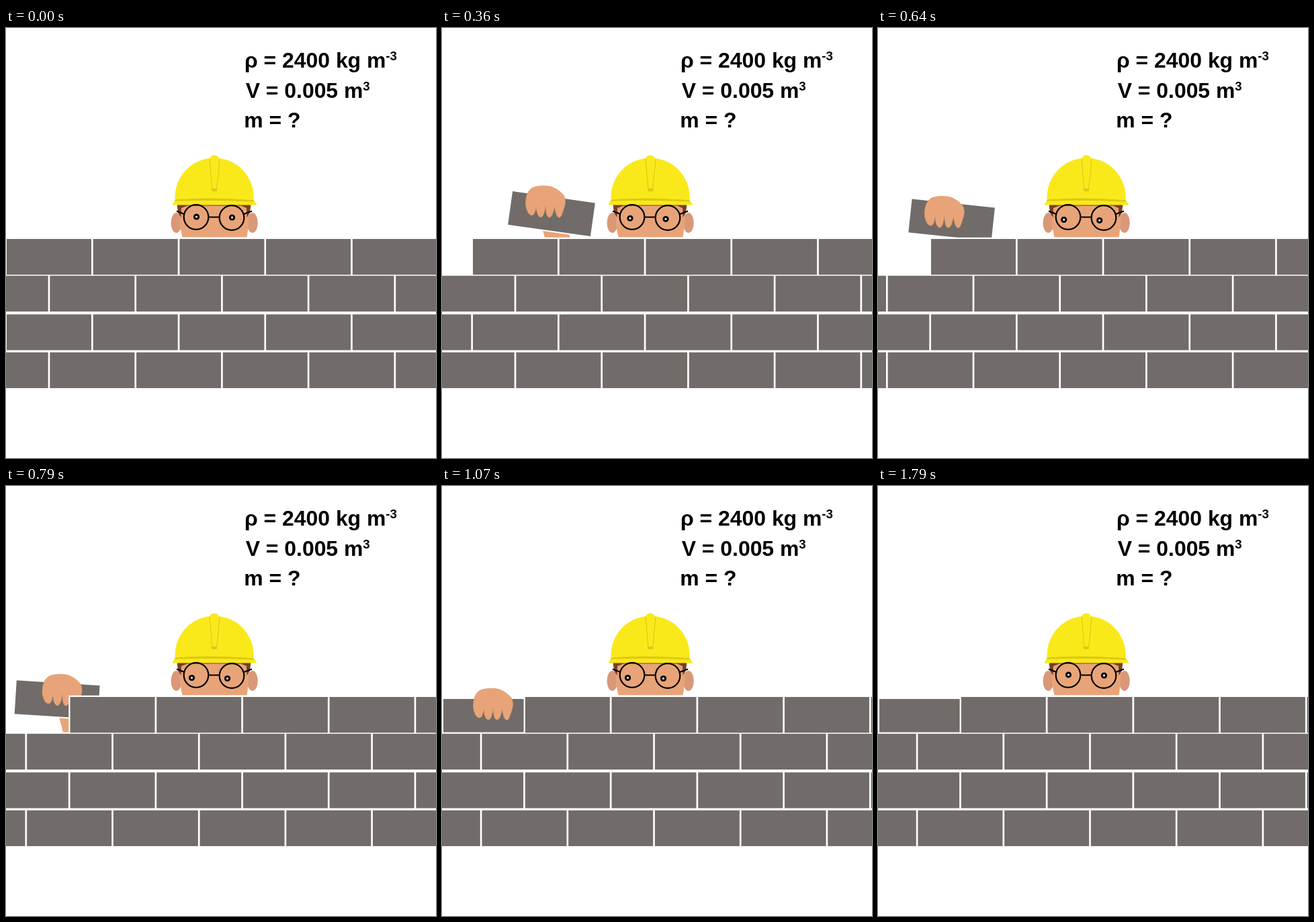
Animation, 640 px wide and 640 px high, one loop 1930 ms. Source, as an HTML page:

```html
<!DOCTYPE html>
<html lang="en">
<head>
<meta charset="utf-8">
<title>Bricklayer</title>
<style>
  html, body { margin: 0; width: 100%; height: 100%; overflow: hidden; background: #fff; }
  svg { display: block; width: 100%; height: 100%; }
  text { font: bold 31.9px "Liberation Sans", Arial, sans-serif; }
  .sup { font-size: 18.6px; }
  .brick { fill: #716c69; stroke: #fff; paint-order: stroke; }
  .skin { fill: #e8a478; }
  .ear { fill: #d99878; }
  .hair { fill: #7a3f20; }
  .hat { fill: #f9e91a; }
  .shade { fill: #dcc714; }
  .line { fill: none; stroke: #000; stroke-width: 2.2; }
</style>
</head>
<body>
<svg viewBox="0 0 640 640">
  <g>
    <text x="355" y="59.4">ρ = 2400 kg m<tspan class="sup" dy="-11.5">-3</tspan></text>
    <text x="356.7" y="104.4">V = 0.005 m<tspan class="sup" dy="-11.5">3</tspan></text>
    <text x="354.3" y="148">m = ?</text>
  </g>

  <path id="arm" class="skin" d="M17 25H52L63 62 75 112H38L25 62Z"/>
  <rect id="held" class="brick" x="-62" y="-25" width="124" height="50" stroke-width="4"/>
  <path id="hand" class="skin" stroke="#d9966d" stroke-width=".8" d="M1 20C2 14 4 7 11 3
    C19 0 29 -.5 38 1.5C46 4 53 9 57.5 15C60 20 60 27 58 32C56 38 54 47 50.5 47.500
    C46 46 45 39 43.5 31C42 39 40 47 35.5 47C31 46 31 38 30 30
    C29 38 27 47 23 47C18 46 17 38 16 31C15 38 14 44 9 44C4 43 1 34 .5 27Z"/>

  <g>
    <ellipse class="ear" cx="253.5" cy="290" rx="8" ry="15"/>
    <ellipse class="ear" cx="366.8" cy="290" rx="8" ry="15"/>
    <path class="skin" d="M258 262H362L361 294 358.5 311.5H262.5L259 294Z"/>
    <path class="hair" d="M254.5 262H364.5L363 275 358.500 282 358 268 350 264.500H270L261 268 260.500 282 256 275Z"/>
    <path class="hat" d="M251.5 256V252A58.6 58.6 0 0 1 368.7 252V256L373.5 263.4H247.5Z"/>
    <ellipse class="hat" cx="310" cy="195" rx="6.8" ry="5.8"/>
    <path class="shade" d="M251.5 255.5Q310 251 369 256.5L369 258.5Q310 255.5 251.5 257.7Z"/>
    <path fill="none" stroke="#dcc714" d="M303 195L307 242H313.5L318 195"/>
    <path class="shade" d="M306.6 239H314L313.5 243H307Z"/>
    <path class="line" d="M301.5 281.5H318M265.5 277L254 272.5M354 277L366 272.5"/>
    <circle class="line" cx="283" cy="281.5" r="18.3"/>
    <circle class="line" cx="336" cy="282.5" r="18.3"/>
    <g id="eyes">
      <circle cx="283.5" cy="281" r="4.6"/><circle cx="283.5" cy="281" r="1.6" fill="#fff"/>
      <circle cx="336.5" cy="282" r="4.6"/><circle cx="336.5" cy="282" r="1.6" fill="#fff"/>
    </g>
  </g>

  <path id="wall" class="brick" stroke-width="4.4"/>
</svg>
<script>
const LOOP = 1930, FPS = 14, PITCH = 128.7, BRICK = 126;
const el = id => document.getElementById(id);
const [arm, held, hand, eyes, wall] = ['arm', 'held', 'hand', 'eyes', 'wall'].map(el);

const clamp = (v, lo, hi) => Math.min(hi, Math.max(lo, v));
const smooth = v => { const u = clamp(v, 0, 1); return u * u * (3 - 2 * u); };
const arc = (s, peak, centre, bend) => peak + bend * (s - centre) ** 2;

// Running bond: every second row is shifted by half a brick.
wall.setAttribute('d', [314, 368.8, 426.3, 482.8].map((top, row) => {
  let d = '';
  for (let i = row ? -2 : 0; i < 5; i++) {
    d += `M${1 + (i + row % 2 / 2) * PITCH} ${top}h${BRICK}v53.3h${-BRICK}Z`;
  }
  return d;
}).join(''));

const move = (node, x, y, tilt = 0) =>
  node.setAttribute('transform', `translate(${x.toFixed(2)} ${y.toFixed(2)}) rotate(${tilt.toFixed(2)})`);
const show = (node, on) => node.setAttribute('visibility', on ? 'visible' : 'hidden');

function draw(ms) {
  // Steps of 1/14 s, starting on whole hundredths of a second.
  const s = Math.floor((Math.floor(ms / 10) + 0.5) * FPS / 100);
  move(wall, Math.min(12 * s, 3.75 + 8.25 * s, 122.8), 0);

  // The brick flies in an arc and is stopped by its place in the row.
  move(held,
    Math.max(64, arc(s, 217.8, -4.87, -0.5625)),
    Math.min(342, arc(s, 271.4, 6.49, 2.3)),
    clamp(1.2 * (14 - s), 0, 8));
  show(held, s > 0);

  // The hand brings the brick, rests on it, then swings back behind the wall.
  const handX = 46 + 1.03 * Math.max(0, 13.7 - s) ** 2 + 4 * Math.max(0, s - 19.5) ** 2;
  const handY = Math.min(301, arc(s, 233, 5.95, 1.84), arc(s, 235, 22.08, 12.4));
  for (const part of [arm, hand]) {
    move(part, handX, handY);
    show(part, s > 0 && s < 25);
  }

  const look = smooth(s / 10) - smooth((s - 15) / 7);
  move(eyes, -7 * look, 4.5 * look);
}

const start = performance.now();
function tick() {
  draw((performance.now() - start) % LOOP);
  requestAnimationFrame(tick);
}
tick();
</script>
</body>
</html>
```
